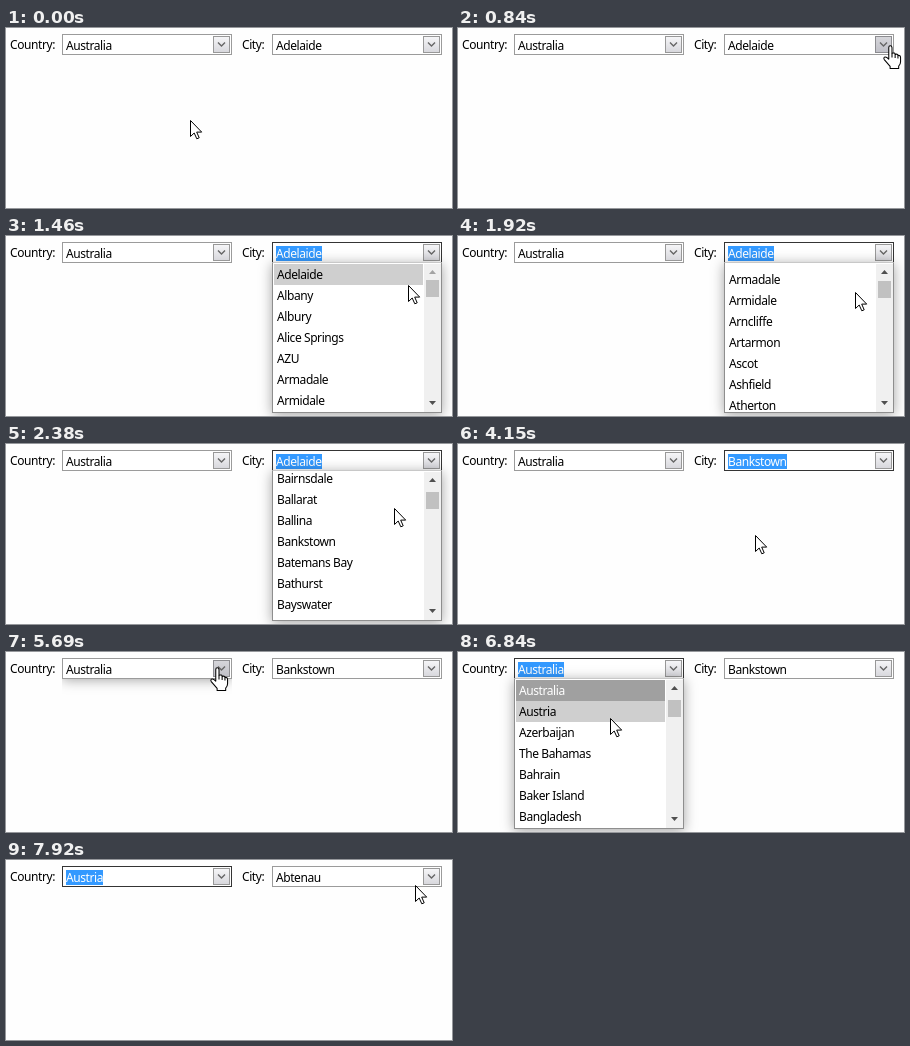
Recreate the animation shown at these times as an HTML page. Size 446 by 180 pixels, loop 8000 ms.

```html
<!DOCTYPE html>
<html lang="en">
<head>
<meta charset="utf-8">
<title>Cascading combo boxes</title>
<style>
html, body { margin: 0; width: 100%; height: 100%; overflow: hidden; background: #fefefe; }
#stage { position: relative; width: 446px; height: 180px; overflow: hidden;
  font: 12px/20px "Noto Sans", "Open Sans", sans-serif; letter-spacing: -.42px; color: #000;
  white-space: nowrap; cursor: default; }
#stage * { position: absolute; box-sizing: border-box; }
.label { top: 7px; }
.field { top: 6px; width: 170px; height: 21px; border: 1px solid #9b9b9b; background: #fff; }
.field.focus { border-color: #343434; }
.value { left: 3px; top: 3px; height: 15px; line-height: 15px; }
.focus .value { background: #3399ff; color: #fff; }
.button { right: 1px; top: 1px; width: 17px; height: 17px; border: 1px solid #989898;
  background: linear-gradient(#f5f5f7, #d8d8dd); }
.button.hover { border-color: #8c8c90; background: linear-gradient(#d6d6da, #c0c0c8); }
.button svg { left: 3px; top: 4px; }
.popup { top: 26px; width: 170px; height: 151px; }
.panel { inset: 0; border: 1px solid #8e8e8e; border-top-color: #c8c8c8; background: #fff;
  overflow: hidden; box-shadow: 0 2px 12px rgba(0,0,0,.36); }
.rows { left: 1px; width: 149px; }
.row { left: 0; width: 149px; height: 21px; line-height: 21px; padding-left: 3px; }
.row.selected { background: #a0a0a0; color: #fff; }
.row.hover { background: #cfcfcf; color: #000; }
.bar { right: 0; top: 1px; width: 17px; height: 148px; background: #f0f0f0; }
.bar svg { left: 5px; fill: #505050; }
.bar .disabled { fill: #a3a3a3; }
.thumb { left: 2px; width: 13px; height: 17px; background: #c1c1c1; }
#arrow, #hand { left: 0; top: 0; overflow: visible; }
</style>
</head>
<body>
<div id="stage"></div>
<script>
const LOOP = 8000, STEP = LOOP / 104, ROW = 21, PANEL = 151;
const stage = document.getElementById('stage');

const cities = ['Adelaide', 'Albany', 'Albury', 'Alice Springs', 'AZU', 'Armadale', 'Armidale',
  'Arncliffe', 'Artarmon', 'Ascot', 'Ashfield', 'Atherton', 'Auburn', 'Ayr', 'Bairnsdale',
  'Ballarat', 'Ballina', 'Bankstown', 'Batemans Bay', 'Bathurst', 'Bayswater', 'Beaconsfield'];
const countries = ['Australia', 'Austria', 'Azerbaijan', 'The Bahamas', 'Bahrain',
  'Baker Island', 'Bangladesh', 'Barbados'];

// [time, x, y] of the pointer tip
const pointerPath = [
  [0, 184, 92], [120, 186, 91], [770, 433, 19], [1000, 428, 18], [1130, 426, 19],
  [1450, 402, 49], [1700, 401, 52], [2300, 388, 64], [2600, 388, 64], [3350, 310, 94],
  [3700, 298, 92], [4150, 297, 91], [4550, 299, 99], [4850, 297, 98], [5450, 211, 17],
  [5900, 211, 17], [6500, 160, 62], [6800, 152, 66], [7180, 152, 66], [7610, 297, 53],
  [7840, 402, 19], [7920, 409, 25]
];
// [time, offset] of the city list
const scrollPath = [[1750, 0], [1880, 100], [1960, 100], [2080, 200], [2160, 200], [2300, 298]];

const smooth = u => u * u * (3 - 2 * u);

function sample(path, t) {
  const next = path.findIndex(key => key[0] > t);
  if (next === 0) return path[0].slice(1);
  if (next < 0) return path[path.length - 1].slice(1);
  const a = path[next - 1], b = path[next];
  const u = smooth((t - a[0]) / (b[0] - a[0]));
  return a.slice(1).map((v, i) => Math.round(v + (b[i + 1] - v) * u));
}

function add(parent, className, text = '') {
  const node = document.createElement('div');
  node.className = className;
  node.textContent = text;
  return parent.appendChild(node);
}

function addSvg(parent, width, height, body, attributes = '') {
  parent.insertAdjacentHTML('beforeend',
    `<svg width="${width}" height="${height}" ${attributes}>${body}</svg>`);
  return parent.lastElementChild;
}

function makeCombo(caption, labelX, x, items) {
  const label = add(stage, 'label', caption);
  label.style.left = labelX + 'px';
  const field = add(stage, 'field');
  const value = add(field, 'value');
  const button = add(field, 'button');
  addSvg(button, 9, 7, '<path d="M1 1.5L4.5 5 8 1.5" fill="none" stroke="#666" stroke-width="1.4"/>');
  const popup = add(stage, 'popup');
  const panel = add(popup, 'panel');
  const rowBox = add(panel, 'rows');
  const rows = items.map((name, i) => {
    const row = add(rowBox, 'row', name);
    row.style.top = i * ROW + 'px';
    return row;
  });
  const bar = add(panel, 'bar');
  const up = addSvg(bar, 7, 4, '<path d="M0 4L3.5 0 7 4Z"/>');
  const down = addSvg(bar, 7, 4, '<path d="M0 0L3.5 4 7 0Z"/>');
  up.style.top = '6px';
  down.style.top = '137px';
  const thumb = add(bar, 'thumb');
  popup.style.left = field.style.left = x + 'px';
  return { x, popup, panel, rowBox, rows, up, thumb, field, value, button };
}

const country = makeCombo('Country:', 4, 56, countries);
const city = makeCombo('City:', 236, 266, cities);

const outline = 'fill="#fff" stroke="#000" stroke-linejoin="round"';
const arrow = addSvg(stage, 13, 20,
  `<path d="M.5 .5V16.5L4.2 13 6.8 18.8 9.2 17.8 6.7 12.1H11.7Z" ${outline}/>`, 'id="arrow"');
const hand = addSvg(stage, 18, 24,
  `<path d="M5.5 13.5V2.5Q5.5 .7 7 .7T8.6 2.5V8Q11.4 7 11.6 9 14 8.2 14.3 10 16.8 9.6 16.8 12V16
   Q16.8 18.5 15 20.3V22.5H6.8V20.5L1.2 14Q.2 12.3 1.6 11.6 3 11 5.5 13.5Z" ${outline}/>
   <path d="M8.6 8V12M11.6 9V12.5M14.3 10V13" stroke="#000"/>`, 'id="hand" viewBox="0 0 17.2 23"');

function drawCombo(combo, state) {
  const { text, focus, open, scroll, atTop, thumb, hoverRow, hot } = state;
  combo.value.textContent = text;
  combo.field.classList.toggle('focus', focus);
  combo.button.classList.toggle('hover', hot);
  combo.popup.style.display = open < 0 ? 'none' : 'block';
  // the list slides out from under the field, its shadow showing only below
  combo.popup.style.clipPath = open < 1 ? 'inset(1px 0 -16px)' : 'none';
  combo.panel.style.transform = `translateY(${Math.round(PANEL * (open - 1))}px)`;
  combo.rowBox.style.top = 1 - scroll + 'px';
  combo.up.classList.toggle('disabled', atTop);
  combo.thumb.style.top = thumb + 'px';
  combo.rows.forEach((row, i) => {
    row.classList.toggle('hover', i === hoverRow);
    row.classList.toggle('selected', i === 0);
  });
}

// -1 while closed, otherwise the visible share of the sliding list
function openness(t, from, to) {
  if (t < from || t >= to) return -1;
  return smooth(Math.min(1, (t - from) / 260));
}

function rowUnder(combo, x, y, scroll) {
  const inside = y >= 29 && x > combo.x && x < combo.x + 152;
  return inside ? Math.floor((y - 29 + scroll) / ROW) : -1;
}

function draw(time) {
  const t = Math.floor((time % LOOP + 10) / STEP) * STEP;
  const [x, y] = sample(pointerPath, t);
  const [scroll] = sample(scrollPath, t);
  const onButton = combo => y < 28 && x >= combo.x + 151 && x <= combo.x + 168;
  const scrolling = t > 1740 && t < 2600;

  drawCombo(country, {
    text: t < 7060 ? 'Australia' : 'Austria',
    focus: t > 5720,
    open: openness(t, 5690, 7060),
    scroll: 0,
    atTop: false,
    thumb: 20,
    hoverRow: rowUnder(country, x, y, 0),
    hot: onButton(country)
  });
  drawCombo(city, {
    text: t < 3720 ? 'Adelaide' : t < 7380 ? 'Bankstown' : 'Abtenau',
    focus: t > 1030 && t < 4680,
    open: openness(t, 990, 3720),
    scroll,
    atTop: scroll === 0,
    thumb: 16 + Math.round(scroll * 4 / 298),
    hoverRow: scrolling ? -1 : rowUnder(city, x, y, scroll),
    hot: onButton(city)
  });

  const pointing = onButton(country) || onButton(city);
  arrow.style.display = pointing ? 'none' : 'block';
  hand.style.display = pointing ? 'block' : 'none';
  arrow.style.transform = `translate(${x}px, ${y}px)`;
  hand.style.transform = `translate(${x - 7}px, ${y - 2}px)`;
}

const start = performance.now();
function tick() {
  draw(performance.now() - start);
  requestAnimationFrame(tick);
}
tick();
</script>
</body>
</html>
```
